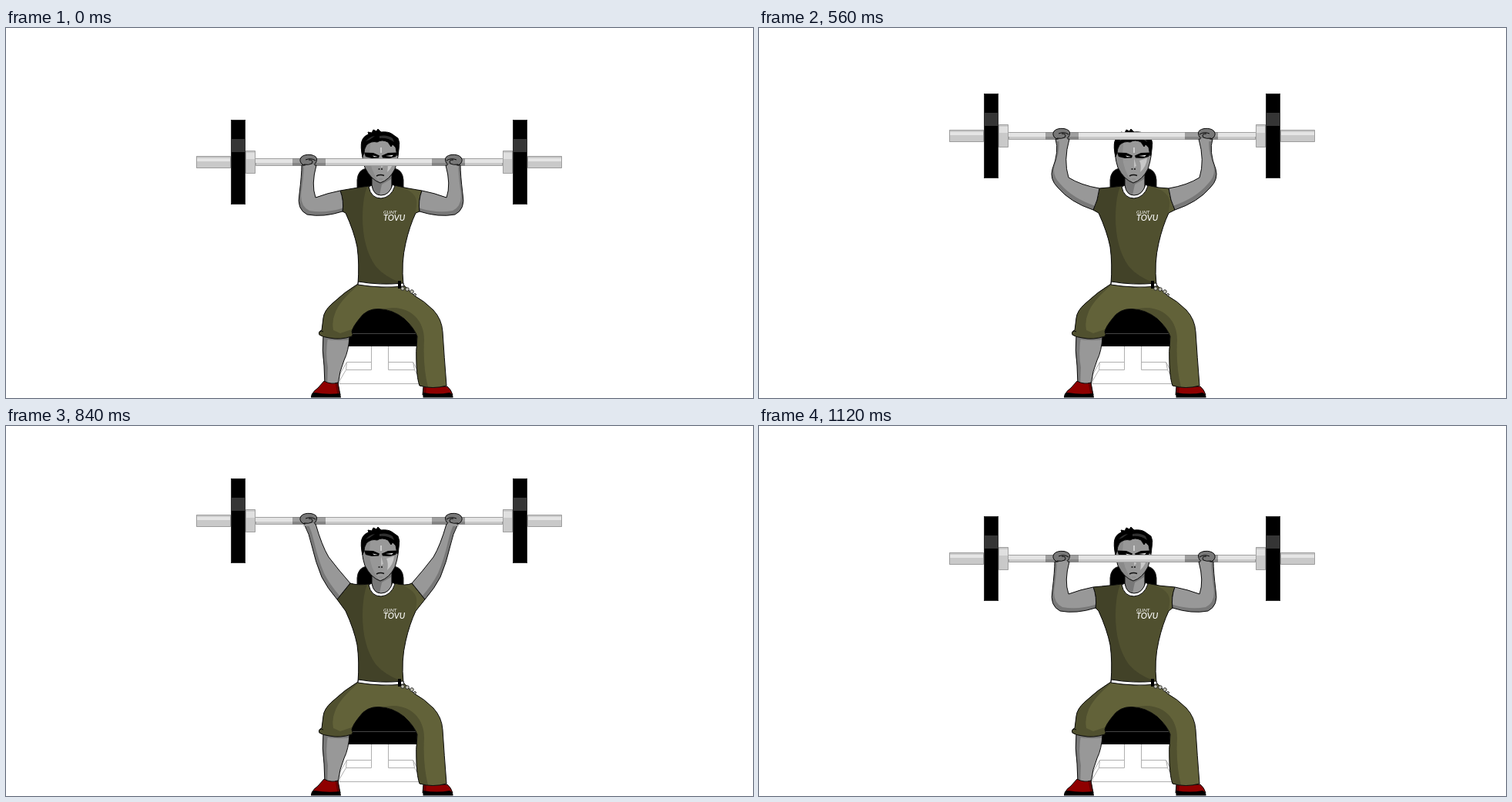
An HTML page with a canvas for the animation above (1.54 s loop, 970x480 px).

```html
<!DOCTYPE html>
<html lang="en">
<head>
<meta charset="utf-8">
<title>Shoulder press</title>
<style>
html, body { margin: 0; width: 100%; height: 100%; overflow: hidden; background: #fff; }
canvas { display: block; }
</style>
</head>
<body>
<canvas id="stage" width="970" height="480"></canvas>
<script>
const ctx = document.getElementById('stage').getContext('2d');

const LOOP = 1540, REST = 420, STEP = 70;
const LIFTS = [0, 2, 18, 34, 43, 51, 54, 51, 43, 34, 18, 2];
const BAR_Y = 174, MIRROR = 974;
const SKIN = '#989898', SKIN_DARK = '#787878', INK = '#0a0a0a';
const SHIRT = '#50502f', SHIRT_DARK = '#424228', SHIRT_LIGHT = '#5b5b36';
const PANTS = '#626239', PANTS_DARK = '#50502f';

// Left arm: start point, then control and end point of six curves
// (outer elbow, elbow tip, sleeve bottom, sleeve top, inner elbow, wrist).
const LOW = [384,178, 384,190, 381,215, 377,235, 391,242, 412,246, 437,238,
  439,224, 434,211, 418,214, 402,220, 396,203, 403,178];
const MID = [385,144, 390,160, 381,183, 377,196, 388,207, 404,226, 434,236,
  440,224, 442,208, 418,204, 402,194, 395,172, 403,144];
const HIGH = [387,127, 394,140, 397,155, 402,177, 410,196, 417,210, 430,225,
  438,215, 447,204, 432,187, 419,170, 410,155, 402,127];

const shiftY = (pts, d) => pts.map((v, i) => i % 2 ? v + d : v);
const mix = (a, b, k) => a.map((v, i) => v + (b[i] - v) * k);

function armPose(lift) {
  if (lift <= 2) return shiftY(LOW, -lift);
  if (lift <= 34) return mix(shiftY(LOW, -2), MID, (lift - 2) / 32);
  if (lift <= 51) return mix(MID, HIGH, (lift - 34) / 17);
  return shiftY(HIGH, 51 - lift);
}

function shape(path, fill, stroke = INK, width = 1) {
  const p = typeof path === 'string' ? new Path2D(path) : path;
  if (fill) { ctx.fillStyle = fill; ctx.fill(p); }
  if (stroke) { ctx.strokeStyle = stroke; ctx.lineWidth = width; ctx.stroke(p); }
  return p;
}

// Fill a shape, add shading clipped to it, then outline it.
function shaded(path, fill, shades) {
  const p = shape(path, fill, null);
  ctx.save();
  ctx.clip(p);
  shades.forEach(([d, color]) => shape(d, color, null));
  ctx.restore();
  shape(p, null);
}

function box(x, y, w, h, fill, stroke) {
  ctx.fillStyle = fill;
  ctx.fillRect(x, y, w, h);
  if (stroke) {
    ctx.strokeStyle = stroke;
    ctx.lineWidth = 1;
    ctx.strokeRect(x + .5, y + .5, w - 1, h - 1);
  }
}

function bench() {
  shape('M456 210 V197 Q457 184 468 182 H504 Q515 184 516 197 V210 Z', '#000', '#222');
  shape('M474.5 413 V443.5 H441.5 L442.5 433.5 H474 M496.5 413 V443.5 H530.5 L528.5 433.5 H496 ' +
    'M442.5 433.5 L433 450 V461.5 H537.5 V450 L528.5 433.5 M441.5 443.5 L433 458 M530.5 443.5 L537 454',
    null, '#b0b0b0');
  shape('M445 413 V396 Q450 362 484 361 Q525 364 534 396 V413 Z', '#000', null);
  shape('M446 396.5 H533', null, '#444');
}

function legs() {
  shaded('M412 398 Q410 418 413 438 L414 463 Q423 467 431 462 Q433 445 439 431 Q445 419 446 400 Z',
    SKIN, [['M408 396 H419 Q414 420 418 440 L417 468 H408 Z', SKIN_DARK],
      ['M408 396 H450 V404 Q428 407 412 403 Z', SKIN_DARK]]);
  shaded('M413 458 Q422 463 431 460 L434 476 H397 Q399 471 405 467 Z', '#8f0000',
    [['M427 458 H436 V478 H431 Z', '#650000']]);
  shape('M396 479.5 Q396 473 401 473 Q417 476 434 474 L435 479.5 Z', '#000', null);
  shaded('M542 465 L541 476 H580 Q578 469 573 465 Z', '#8f0000',
    [['M540 463 H546 L545 478 H540 Z', '#650000']]);
  shape('M541.5 479.5 L541.5 473 Q560 476 576 473 Q581 475 580.5 479.5 Z', '#000', null);

  shaded('M457 332 Q440 342 423 358 Q413 367 412 376 L410 392 Q405 394 407 398 ' +
    'Q411 401 420 402 Q434 405 449 400 Q451 398 449 394 Q450 388 459 377 Q468 364 484 364.5 ' +
    'Q502 365 517 377 Q530 389 534 400 Q532 420 533 438 Q534 456 537 464 Q554 469 572 464 ' +
    'Q569 426 567 394 Q566 378 555 366 Q543 354 530 347 L516 333 Z', PANTS,
    [['M404 330 H462 Q432 354 427 371 Q423 380 425 392 L434 396 L449 391 V408 H404 Z', PANTS_DARK],
     ['M484 366 Q507 359 525 369 Q543 381 543 405 Q541 440 549 470 H530 V400 Q512 372 484 366 Z', PANTS_DARK]]);
  shape('M407 394 Q409 392 412 394', null);
}

function torso(pose) {
  const [bx, by, cx, cy, tx, ty] = pose.slice(12, 18);
  shape('M475 190 V206 Q477 219 487 219 Q498 218 501 206 V188 Z', SKIN_DARK);
  shape('M488 203 L500 196 V208 Q494 218 485 217 Z', SKIN, null);
  const body = `M471 205 Q456 207 ${tx} ${ty} Q${cx} ${cy} ${bx} ${by} L441 240
    Q452 264 456 284 Q459 306 457 332 Q487 339 516 333 Q513 304 519 279 Q524 257 532 240
    L${MIRROR - bx} ${by} Q${MIRROR - cx} ${cy} ${MIRROR - tx} ${ty} Q520 208 504 204
    Q500 219 487 220 Q474 219 471 205 Z`;
  shaded(body, SHIRT, [
    ['M425 195 H474 Q463 213 463 245 Q463 285 480 309 Q492 323 512 330 L510 342 H425 Z', SHIRT_DARK],
    ['M503 203 Q531 210 533 224 Q534 235 528 250 L548 240 V200 Z', SHIRT_LIGHT]]);
  shape('M471 206 Q474 221 487 221 Q500 220 505 205 L502 203 Q498 217 487 217 Q477 217 475 204 Z', '#fff');
  shape('M457.5 329 Q486 334 516 331 L517 335 Q487 338 457 333 Z', '#fff');
  box(509, 328, 4, 10, '#000');
  [[515, 338], [521, 339], [527, 342], [531, 346]].forEach(([x, y], i) => {
    const ring = new Path2D();
    ring.arc(x, y, i < 3 ? 2.3 : 1.5, 0, 7);
    shape(ring, '#c5c5b8', '#222', .9);
  });

  ctx.fillStyle = '#fff';
  ctx.font = 'italic 6.5px Lato, sans-serif';
  ctx.fillText('GLINT', 490, 241);
  ctx.font = 'italic 500 11px Lato, sans-serif';
  ctx.fillText('TOVU', 490, 249.5);
}

function head() {
  shaded('M462 148 Q461 166 466 181 Q474 197 486 201 Q498 197 505 183 Q511 165 510 148 L500 138 H470 Z',
    SKIN, [['M460 140 H474 L472 164 Q472 184 486 202 H460 Z', '#8a8a8a'],
      ['M494 172 L504 169 Q503 180 495 187 Q497 178 494 172 Z', '#c8c8c8'],
      ['M486 155 H488 V162 H486 Z', '#ccc'],
      ['M487 169 L490 179 L487 181 Z', '#c0c0c0']]);
  shape('M465 161.5 L477 162 L485 165.5 L484 168.5 L475 169 L467 167 Z', '#000', null);
  shape('M508 161.5 L496 162 L488 165.5 L489 168.5 L498 169 L506 167 Z', '#000', null);
  shape('M476 165.5 L483 167 L478 167.2 Z M503 164.8 L493 166 L501 166.8 Z', '#eee', null);
  shape('M483.5 183 H485.5 M487 183 H489', null, '#111', 1.5);
  shape('M481 192 Q486 189.5 491 191.5', null, '#111', 1.5);
  shape('M484 196 H489', null, '#858585');
  shape('M463 167 Q460 154 462 147 Q464 140 471 138 L470 135 L475 136 L477 132 L481 134 L483 131 ' +
    'L487 135 Q497 134 502 138 L509 143 Q512 149 510 156 L508 166 L506 155 L502 151 L500 154 ' +
    'L496 148 Q488 144 482 148 Q474 146 468 152 Q465 157 465 162 Z', '#000');
  shape('M485 140 Q495 138 502 143 L504 148 Q496 142 485 143 Z M467 147 Q472 141 479 140 L472 145 Z', '#303030', null);
}

function barbell(y) {
  box(324, y - 5, 321, 10, '#c9c9c9', '#a0a0a0');
  box(324, y - 4, 321, 5, '#e4e4e4');
  for (const x of [372, 553]) {
    box(x, y - 5, 43, 10, '#858585');
    box(x, y - 4, 43, 5, '#a0a0a0');
  }
  for (const [end, plate, collar] of [[247, 292, 311], [677, 658, 645]]) {
    box(end, y - 8, 45, 16, '#c9c9c9', '#9c9c9c');
    box(end + 1, y - 5, 43, 4, '#e5e5e5');
    box(collar, y - 15, 13, 30, '#c9c9c9', '#a0a0a0');
    box(collar + 1, y - 12, 11, 8, '#e0e0e0');
    box(plate, y - 55, 19, 110, '#000', '#303030');
    box(plate + 1, y - 30, 17, 17, '#353535');
  }
}

function arm(pose, y) {
  let d = `M${pose[0]} ${pose[1]}`;
  for (let i = 2; i < pose.length; i += 4) d += ` Q${pose.slice(i, i + 4).join(' ')}`;
  const outline = new Path2D(d + ' Z');
  const lit = new Path2D();
  lit.addPath(outline, new DOMMatrix([1, 0, 0, 1, 3, -5]));
  shaded(outline, SKIN_DARK, [[lit, SKIN]]);

  ctx.save();
  ctx.translate(0, y);
  shape('M385 3 Q380 -1 383 -6 Q387 -10.5 396 -9.5 Q404 -8 403.5 -3 Q403 3 397 4.5 Q391 6 385 3 Z', SKIN_DARK);
  shape('M387 5 Q393 2 400 3 L402 7 H386 Z', SKIN, null);
  shape('M389 -3 Q396 -6 402 -2 M393 -3 Q400 -3 397 2 Q393 4 387 3', null);
  ctx.restore();
}

function draw(lift) {
  const pose = armPose(lift), y = BAR_Y - lift;
  ctx.fillStyle = '#fff';
  ctx.fillRect(0, 0, 970, 480);
  bench();
  legs();
  torso(pose);
  head();
  barbell(y);
  arm(pose, y);
  ctx.save();
  ctx.translate(MIRROR, 0);
  ctx.scale(-1, 1);
  arm(pose, y);
  ctx.restore();
}

let start = null;
function tick(now) {
  if (start === null) start = now;
  const t = (now - start) % LOOP;
  const step = t < REST ? 0 : Math.min(11, 1 + Math.floor((t - REST) / STEP));
  draw(LIFTS[step]);
  requestAnimationFrame(tick);
}

ctx.lineJoin = 'round';
draw(0);
requestAnimationFrame(tick);
</script>
</body>
</html>
```
